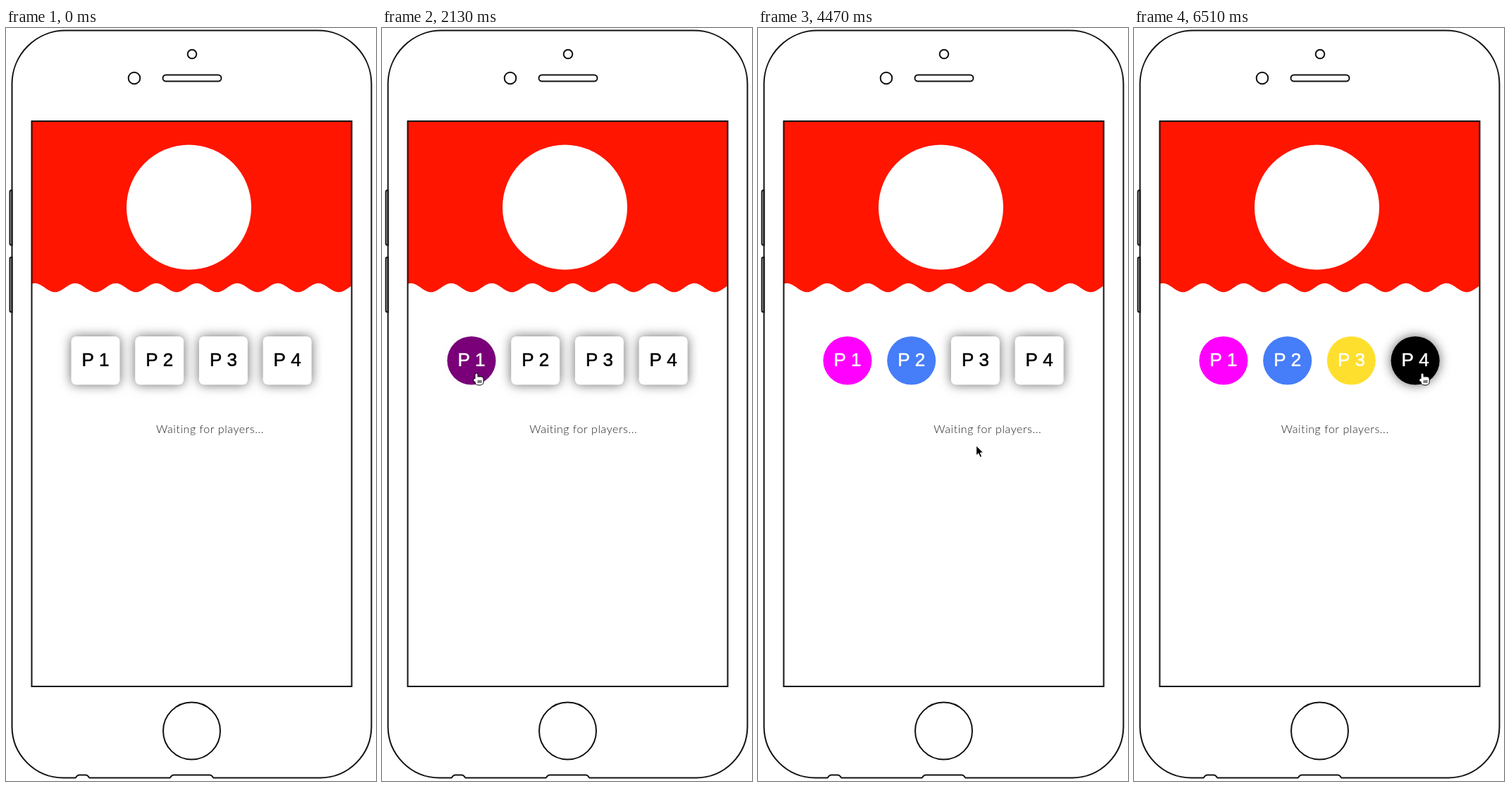
Write an HTML page with a canvas that moves like this. It is 525 px wide and 1067 px high and loops after 6.54 s.

```html
<!DOCTYPE html>
<html lang="en">
<head>
<meta charset="utf-8">
<title>Waiting for players</title>
<style>
  html, body { margin: 0; width: 100%; height: 100%; overflow: hidden; background: #fff; }
  canvas { display: block; width: 525px; height: 1067px; }
</style>
</head>
<body>
<canvas id="stage"></canvas>
<script>
const W = 525, H = 1067, LOOP = 6540, STEP = 30;
const canvas = document.getElementById('stage');
const ctx = canvas.getContext('2d');
const ratio = window.devicePixelRatio || 1;
canvas.width = W * ratio;
canvas.height = H * ratio;
ctx.scale(ratio, ratio);

const SCREEN = { x: 36.5, y: 132, w: 454, h: 801 };
const CARD = { x: 92.5, y: 437, w: 69, h: 68.5, pitch: 90.7 };

// grip: where the pointer rests, relative to the card
const players = [
  { hover: 1130, click: 2014, color: [255, 0, 255], grip: 37 },
  { hover: 3460, click: 3796, color: [70, 125, 248], grip: 46 },
  { hover: 4730, click: 5360, color: [255, 223, 46], grip: 51 },
  { hover: 6040, click: Infinity, color: [0, 0, 0], grip: 40 }
].map((player, i) => {
  const x = CARD.x + i * CARD.pitch;
  return {
    ...player, x, label: 'P ' + (i + 1),
    restX: x + player.grip, restY: 489,
    arrive: player.hover + 40, leave: player.click + 150
  };
});
const entry = { restX: 150, restY: 603, leave: 960 };

// The message bounces between two walls; at each cut it has travelled further.
const MARQUEE = { left: 36, range: 305, start: 177, speed: 0.1637 };
const cuts = [
  { at: 960, jump: 521 }, { at: 2800, jump: 95 },
  { at: 4296, jump: 92 }, { at: 5725, jump: 52 }
];

const mix = (a, b, p) => a + (b - a) * p;
const smooth = p => {
  p = Math.min(1, Math.max(0, p));
  return p * p * (3 - 2 * p);
};

function shape(build, fill, stroke) {
  ctx.beginPath();
  build();
  if (fill) {
    ctx.fillStyle = fill;
    ctx.fill();
  }
  if (stroke) {
    ctx.strokeStyle = stroke;
    ctx.stroke();
  }
}

const box = (x, y, w, h, r, fill, stroke) =>
  shape(() => ctx.roundRect(x, y, w, h, r), fill, stroke);
const disc = (x, y, r, fill, stroke) =>
  shape(() => ctx.arc(x, y, r, 0, Math.PI * 2), fill, stroke);

function drawHeader() {
  const right = SCREEN.x + SCREEN.w;
  shape(() => {
    ctx.moveTo(SCREEN.x, SCREEN.y);
    for (let x = SCREEN.x; x <= right; x++) {
      ctx.lineTo(x, 368 - 6.3 * Math.cos((x - 98.2) / 57.5 * Math.PI * 2));
    }
    ctx.lineTo(right, SCREEN.y);
  }, '#ff1500');
  disc(259.5, 254, 88.5, '#fff');
}

// Shallow notch in the bottom edge of the body
function drawNotch(x, width) {
  const base = 1062.5, top = 1058.5;
  ctx.fillStyle = '#fff';
  ctx.fillRect(x, top, width, 6);
  shape(() => {
    ctx.moveTo(x, base);
    ctx.quadraticCurveTo(x + 2, top, x + 5, top);
    ctx.lineTo(x + width - 5, top);
    ctx.quadraticCurveTo(x + width - 2, top, x + width, base);
  }, null, '#111');
}

function drawPhone() {
  const ink = '#111';
  ctx.lineWidth = 2;
  box(8.5, 3.5, 510, 1059, [76, 76, 73, 73], null, ink);
  drawNotch(99, 19);
  drawNotch(233, 61);
  for (const y of [230, 325]) box(5.5, y, 3, 77.5, [2, 0, 0, 2], null, ink);
  disc(264, 37, 6.3, null, ink);
  disc(182, 71, 8.3, null, ink);
  disc(263.5, 996, 40.5, null, ink);
  box(222.5, 66.5, 83, 9, 4.5, null, ink);
  box(SCREEN.x, SCREEN.y, SCREEN.w, SCREEN.h, 0, null, ink);
}

function drawCard(player, t) {
  const hover = smooth((t - player.hover) / 250);
  const picked = smooth((t - player.click) / 240);
  const channels = player.color.map(c => Math.round(mix(mix(255, 0, hover), c, picked)));

  ctx.save();
  ctx.shadowBlur = 16 * ratio;
  ctx.shadowColor = `rgba(0,0,0,${0.6 * Math.max(0, 1 - 2 * picked)})`;
  box(player.x, CARD.y, CARD.w, CARD.h, mix(7, CARD.h / 2, hover), `rgb(${channels})`);
  ctx.restore();

  const tone = Math.round(255 * hover);
  ctx.fillStyle = ctx.strokeStyle = `rgb(${tone},${tone},${tone})`;
  ctx.font = '26px "Liberation Sans", Arial, sans-serif';
  ctx.textAlign = 'center';
  ctx.lineWidth = 0.5;
  ctx.fillText(player.label, player.x + CARD.w / 2, 479);
  ctx.strokeText(player.label, player.x + CARD.w / 2, 479);
}

function drawMessage(t) {
  const { left, range, start, speed } = MARQUEE;
  const travel = cuts.reduce((sum, cut) => sum + (t >= cut.at ? cut.jump : 0), start + speed * t);
  const x = left + range - Math.abs(range - travel % (2 * range));

  ctx.fillStyle = '#222';
  ctx.font = '300 16px Lato, sans-serif';
  ctx.letterSpacing = '0.55px';
  ctx.textAlign = 'left';
  ctx.fillText('Waiting for players...', x, 574);
  ctx.letterSpacing = '0px';
}

// Rests on a card, then swings below the row to the next one.
function pointerAt(t) {
  const next = players.findIndex(player => player.arrive > t);
  const to = players.at(next);
  if (next < 0) return [to.restX, to.restY];
  const from = next ? players[next - 1] : entry;
  const p = Math.max(0, (t - from.leave) / (to.arrive - from.leave));
  const dip = next ? 113 * Math.sin(p * Math.PI) : 0;
  return [
    mix(from.restX, to.restX, Math.sin(p * Math.PI / 2)),
    mix(from.restY, to.restY, p) + dip
  ];
}

function drawHand() {
  const parts = () => {
    ctx.roundRect(3, 0.5, 3, 11, 1.5);
    ctx.roundRect(0.5, 8, 7, 4, 2);
    ctx.roundRect(3, 5.5, 11, 11, [2, 3, 4, 4]);
  };
  ctx.lineWidth = 2;
  shape(parts, null, '#000');
  shape(parts, '#fff');
  ctx.lineWidth = 1;
  for (let x = 7; x <= 11; x += 2) {
    shape(() => {
      ctx.moveTo(x, 10);
      ctx.lineTo(x, 14);
    }, null, '#000');
  }
}

function drawArrow() {
  ctx.lineWidth = 1;
  shape(() => {
    ctx.moveTo(0, 0);
    ctx.lineTo(0, 14);
    ctx.lineTo(3.2, 11);
    ctx.lineTo(5.5, 16.5);
    ctx.lineTo(8, 15.5);
    ctx.lineTo(5.7, 10.2);
    ctx.lineTo(10, 10);
    ctx.closePath();
  }, '#000', '#fff');
}

function drawPointer(t) {
  if (t < entry.leave) return;
  const [x, y] = pointerAt(t);
  const overCard = y < CARD.y + CARD.h && players.some(c => x >= c.x && x <= c.x + CARD.w);
  ctx.save();
  ctx.translate(x, y);
  (overCard ? drawHand : drawArrow)();
  ctx.restore();
}

function draw(t) {
  ctx.fillStyle = '#fff';
  ctx.fillRect(0, 0, W, H);
  drawHeader();
  drawPhone();
  players.forEach(player => drawCard(player, t));
  drawMessage(t);
  drawPointer(t);
}

let began;
function frame(now) {
  began ??= now;
  const t = (now - began) % LOOP;
  draw(Math.floor(t / STEP) * STEP);
  requestAnimationFrame(frame);
}
draw(0);
requestAnimationFrame(frame);
</script>
</body>
</html>
```
